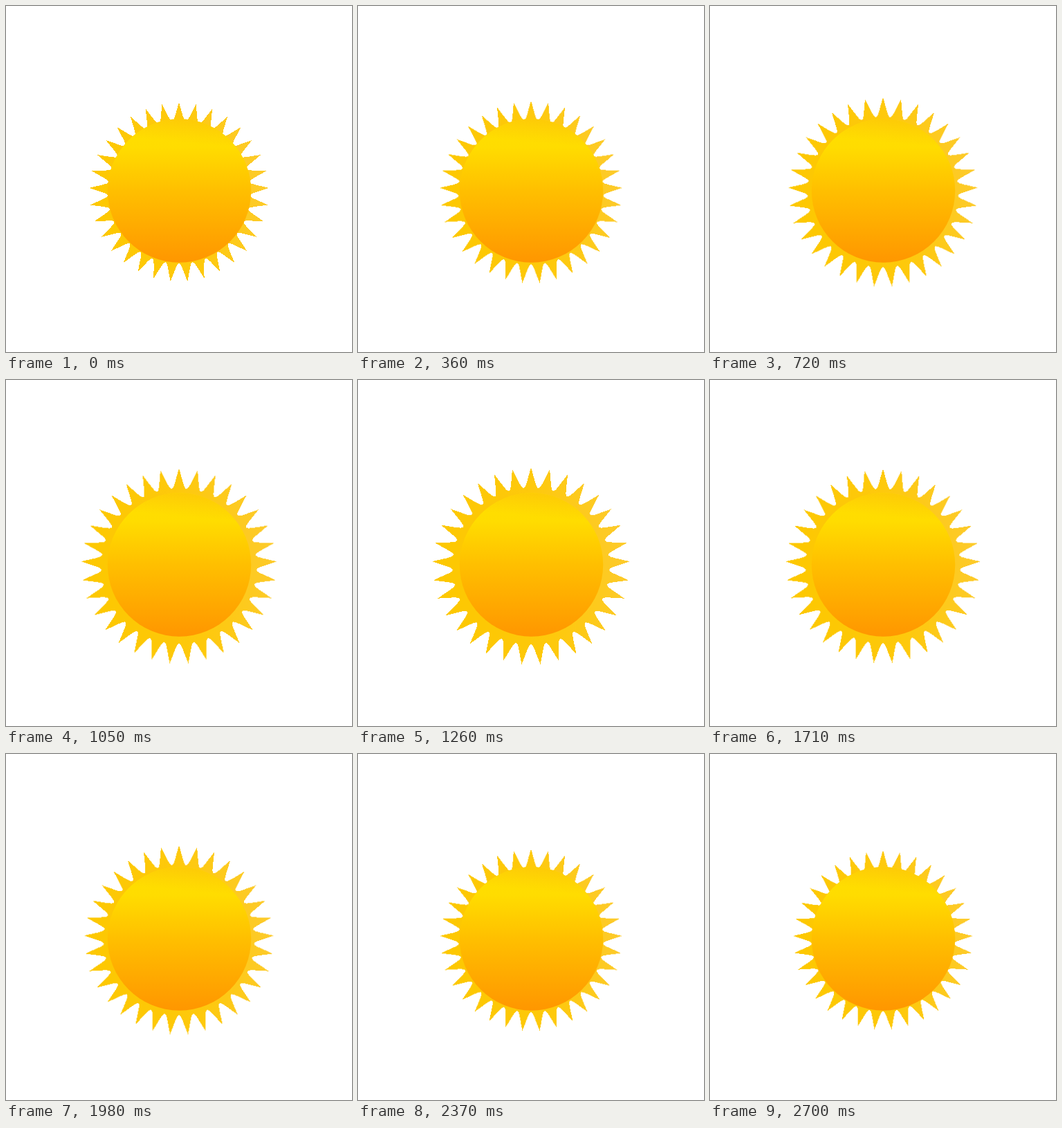
These frames come from a looping animation (500 by 500 pixels, 2.73 s). An HTML page:

```html
<!DOCTYPE html>
<html lang="en">
<head>
<meta charset="utf-8">
<title>Sun</title>
<style>
  html, body { margin: 0; width: 100%; height: 100%; overflow: hidden; background: #fff; }
  svg { display: block; width: 100%; height: 100%; }
  #rays {
    transform-origin: 250px 269px;
    animation: pulse 2730ms infinite;
    shape-rendering: crispEdges;
  }
  /* 1350 ms out, 1350 ms back, 30 ms rest */
  @keyframes pulse {
    0% { transform: scale(1); animation-timing-function: cubic-bezier(.37, 0, .63, 1); }
    49.4505% { transform: scale(1.1); animation-timing-function: cubic-bezier(.37, 0, .63, 1); }
    98.9011%, 100% { transform: scale(1); }
  }
</style>
</head>
<body>
<svg viewBox="0 0 500 500">
  <defs>
    <linearGradient id="corona" gradientUnits="userSpaceOnUse" x1="121" y1="290" x2="379" y2="248">
      <stop offset="0" stop-color="#fdc800"/>
      <stop offset=".55" stop-color="#fec90c"/>
      <stop offset="1" stop-color="#fdcb2c"/>
    </linearGradient>
    <linearGradient id="body" gradientUnits="userSpaceOnUse" x1="0" y1="163" x2="0" y2="371">
      <stop offset="0" stop-color="#ffe000"/>
      <stop offset=".2" stop-color="#ffdc00"/>
      <stop offset=".5" stop-color="#ffbf00"/>
      <stop offset="1" stop-color="#ff9600"/>
    </linearGradient>
    <linearGradient id="shade" gradientUnits="userSpaceOnUse" x1="253" y1="162" x2="250" y2="197">
      <stop offset="0" stop-color="#fdc708" stop-opacity=".9"/>
      <stop offset="1" stop-color="#fdc708" stop-opacity="0"/>
    </linearGradient>
  </defs>
  <path id="rays" fill="url(#corona)"/>
  <circle cx="250.5" cy="267" r="103.7" fill="url(#body)"/>
  <circle cx="250.5" cy="267" r="103.7" fill="url(#shade)"/>
</svg>
<script>
  const COUNT = 33, TIP = 129.7, VALLEY = 103;
  const step = 360 / COUNT;

  const at = (deg, r) => {
    const a = deg * Math.PI / 180;
    return `${(250 + r * Math.sin(a)).toFixed(2)} ${(269 - r * Math.cos(a)).toFixed(2)}`;
  };

  let d = `M${at(0, TIP)}`;
  for (let i = 0; i < COUNT; i++) {
    const a = i * step, b = a + step;
    d += `C${at(a + 2.6, 113)} ${at(a + 3.7, VALLEY)} ${at(a + step / 2, VALLEY)}`;
    d += `C${at(b - 3.7, VALLEY)} ${at(b - 2.6, 113)} ${at(b, TIP)}`;
  }
  document.getElementById('rays').setAttribute('d', d + 'Z');
</script>
</body>
</html>
```
